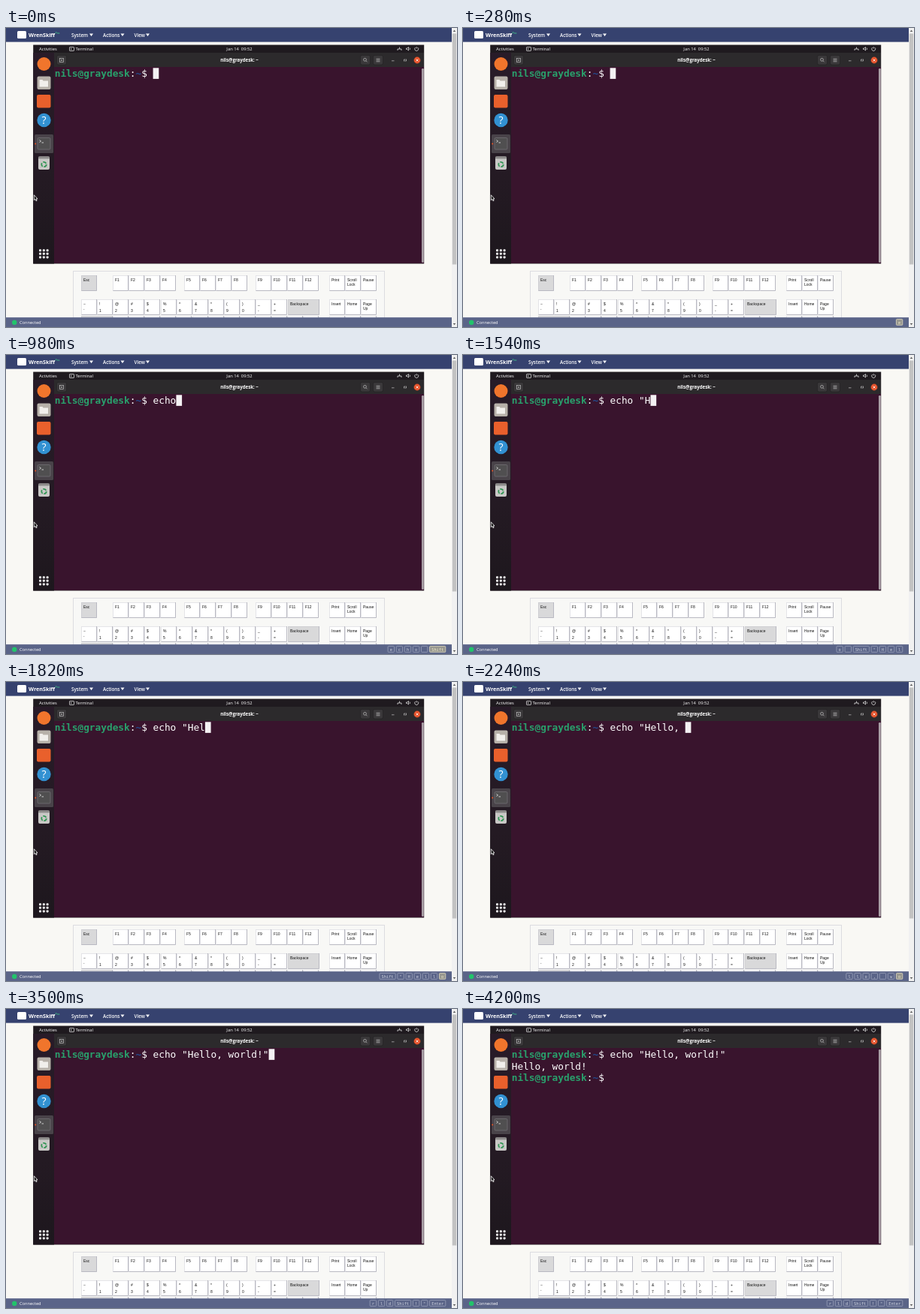
Write an HTML page that moves like this. It is 600 px wide and 399 px high and loops after 4340 ms.

```html
<!DOCTYPE html>
<html lang="en">
<head>
<meta charset="utf-8">
<title>Remote terminal</title>
<style>
  html, body { margin: 0; width: 100%; height: 100%; overflow: hidden; background: #f9f8f4; }
  svg { display: block; width: 600px; height: 399px; }
  text { white-space: pre; }
  .ui { font-family: "Open Sans", "Noto Sans", sans-serif; fill: #fff; }
  .label { font: 5px "Liberation Sans", sans-serif; fill: #111; }
  .term { font: 12.79px "DejaVu Sans Mono", monospace; fill: #fff; }
  .user { font-weight: bold; fill: #29a16c; }
  .path { font-weight: bold; fill: #244a8c; }
  .key { font: 5.3px "DejaVu Sans Mono", monospace; }
</style>
</head>
<body>
<svg viewBox="0 0 600 399">
  <defs>
    <linearGradient id="dock" x2="0" y2="1">
      <stop offset="0" stop-color="#281b28"/>
      <stop offset=".6" stop-color="#241a23"/>
      <stop offset="1" stop-color="#1d171d"/>
    </linearGradient>
  </defs>

  <!-- page -->
  <rect width="600" height="399" fill="#f9f8f4"/>
  <rect width="593" height="18.6" fill="#36426f"/>
  <rect x="15" y="4" width="12" height="10" rx="1.5" fill="#fff"/>
  <g class="ui" font-weight="600" font-size="6.3">
    <text x="30" y="12" font-size="7.2" font-weight="700">WrenSkiff</text>
    <text x="65.5" y="8.2" font-size="3.6" style="fill:#3fc98a">Pro</text>
    <text x="87" y="11.5">System</text>
    <text x="129" y="11.5">Actions</text>
    <text x="170.5" y="11.5">View</text>
    <path d="M111 7.5h5l-2.5 3.5zM152.5 7.5h5l-2.5 3.5zM186 7.5h5l-2.5 3.5z"/>
  </g>

  <!-- remote desktop -->
  <rect x="36.2" y="22.5" width="520" height="292" fill="#1f1a1f"/>
  <rect x="36.2" y="33" width="27.8" height="281.5" fill="url(#dock)"/>
  <g class="ui" font-size="5.8">
    <text x="44" y="30">Activities</text>
    <text x="92.5" y="30">Terminal</text>
    <text x="310.5" y="30" text-anchor="middle">Jan 14  09:52</text>
  </g>
  <g fill="none" stroke="#ddd" stroke-width=".8">
    <rect x="84.5" y="25.5" width="6" height="5" rx=".6"/>
    <path d="M86 27l1.2 1-1.2 1M523.5 25.5v2.5M521 30v-2h5v2"/>
    <path d="M532.5 27h1.2l1.8-1.5v4.5l-1.8-1.5h-1.2zM537 26.5q1.2 1.2 0 2.6"/>
    <path d="M544.7 26a2.5 2.5 0 1 0 3 0M546.2 25v2.5"/>
  </g>

  <!-- window -->
  <rect x="64" y="33" width="492" height="19" fill="#2c2a2c"/>
  <rect x="64" y="52" width="492" height="262" fill="#39142d"/>
  <rect x="553" y="54" width="2.8" height="259" rx="1.2" fill="#a9a0a6"/>
  <text class="ui" x="310.5" y="45" font-size="6.1" font-weight="700" text-anchor="middle">nils@graydesk: ~</text>
  <g fill="#3a383a" stroke="#1e1c1e" stroke-width=".5">
    <rect x="67.5" y="36.5" width="13" height="12.5" rx="2"/>
    <rect x="471.5" y="36.5" width="13" height="12.5" rx="2"/>
    <rect x="488.5" y="36.5" width="13" height="12.5" rx="2"/>
  </g>
  <g fill="none" stroke="#c4c4c4" stroke-width=".7">
    <rect x="71.5" y="40.5" width="5" height="5"/>
    <path d="M74 42v2M73 43h2"/>
    <circle cx="477.5" cy="42.3" r="1.9"/>
    <path d="M479 43.8l1.5 1.5M492.5 41.2h5M492.5 43h5M492.5 44.8h5M513 43.8h3.500"/>
    <path d="M529.5 44.5v-2.5h2M532.5 41.5v2.5h-2"/>
  </g>
  <circle cx="547" cy="43" r="4.4" fill="#e4532c"/>
  <path d="M545.5 41.5l3 3m0-3l-3 3" stroke="#fff" stroke-width=".8"/>

  <!-- dock -->
  <circle cx="50.5" cy="48" r="9" fill="#f0752c"/>
  <rect x="41.5" y="64.5" width="18" height="17.5" rx="2" fill="#b7b1a9"/>
  <path d="M44.5 69h4l1 1.5h6.5v8h-11.500z" fill="#f1efeb"/>
  <rect x="41" y="89" width="18.5" height="17.5" rx="2" fill="#e9602c"/>
  <circle cx="50.5" cy="123" r="9.2" fill="#3291d2"/>
  <text class="ui" x="50.5" y="128" font-size="14" text-anchor="middle">?</text>
  <rect x="38" y="142" width="25" height="25" rx="1.5" fill="#494349"/>
  <circle cx="39.2" cy="154.5" r="1" fill="#e95420"/>
  <rect x="42" y="146.5" width="17" height="15.5" rx="1.5" fill="#504f50" stroke="#77747a" stroke-width=".7"/>
  <path d="M44.5 149.5l2 1.5-2 1.5M47.5 153h2.5" fill="none" stroke="#eee" stroke-width=".8"/>
  <rect x="43" y="171.5" width="15" height="17.5" rx="2" fill="#c9c8c6"/>
  <rect x="43" y="171.5" width="15" height="3" rx="1" fill="#8e8c8b"/>
  <circle cx="50.5" cy="182" r="3.2" fill="none" stroke="#2f9552" stroke-width="1.7" stroke-dasharray="5 1.7"/>
  <g id="apps" fill="#f2f2f2"></g>
  <path d="M37.3 222.8v7l1.6-1.4 1.1 2.4 1.1-.5-1.1-2.3h2z" fill="#111" stroke="#fff" stroke-width=".8"/>

  <!-- terminal -->
  <g class="term">
    <text x="64.7" y="65.3"><tspan class="user">nils@graydesk</tspan>:<tspan class="path">~</tspan>$ <tspan id="typed"></tspan></text>
    <g id="result">
      <text x="64.7" y="80.6">Hello, world!</text>
      <text x="64.7" y="95.9"><tspan class="user">nils@graydesk</tspan>:<tspan class="path">~</tspan>$</text>
    </g>
    <rect id="cursor" width="7.7" height="14.6" fill="#f4f1f3"/>
  </g>

  <!-- on-screen keyboard -->
  <rect x="89.5" y="324.5" width="414" height="80" fill="#f8f8f6" stroke="#dcdce0"/>
  <g id="keyboard"></g>

  <!-- status bar -->
  <rect y="386.2" width="593" height="13" fill="#5a6488"/>
  <circle cx="11.2" cy="393" r="3.2" fill="#22c36b"/>
  <text class="ui" x="18" y="395" font-size="5.7">Connected</text>
  <g id="history"></g>

  <!-- page scrollbar -->
  <rect x="593" width="7" height="399" fill="#f1f1f1"/>
  <rect x="593.8" y="7.5" width="5.4" height="308" fill="#c2c2c2"/>
  <path d="M594.7 5l1.8-2.5 1.8 2.5zM594.7 394l1.8 2.5 1.8-2.500z" fill="#666"/>
</svg>
<script>
const LOOP = 4340, STEP = 140, CELL = 7.7, LEFT = 64.7;
const KEYS = ['e', 'c', 'h', 'o', ' ', 'Shift', '"', ...'Hello, world', 'Shift', '!', '"', 'Enter'];
const $ = id => document.getElementById(id);

function add(parent, tag, attrs, content = '') {
  const node = document.createElementNS('http://www.w3.org/2000/svg', tag);
  for (const name in attrs) node.setAttribute(name, attrs[name]);
  node.textContent = content;
  return parent.appendChild(node);
}

for (let n = 0; n < 9; n++) {
  add($('apps'), 'rect', { x: 44 + n % 3 * 4.8, y: 295.2 + Math.floor(n / 3) * 4.6, width: 3, height: 3, rx: .8 });
}

// Light outline with a darker right and bottom edge.
function drawKey(x, y, label, width = 21, gray = false) {
  add($('keyboard'), 'rect', {
    x: x + .5, y: y + .5, width: width - 1, height: 20,
    fill: gray ? '#d9d9da' : '#fff', stroke: gray ? '#cfcfd3' : '#e4e4e8'
  });
  add($('keyboard'), 'path', {
    d: `M${x + width - .5} ${y}v20.5h${1 - width}`, fill: 'none', stroke: '#b9b9c2'
  });
  const gap = label.length === 3 && label[1] === '\n' ? 9 : 6;
  label.split('\n').forEach((line, n) =>
    add($('keyboard'), 'text', { class: 'label', x: x + 3, y: y + 8 + n * gap }, line));
}
const drawKeys = (x, y, labels) => labels.forEach((label, n) => drawKey(x + Math.round(n * 21.1), y, label));

drawKey(100, 330, 'Esc', 21, true);
drawKeys(142, 330, ['F1', 'F2', 'F3', 'F4']);
drawKeys(237, 330, ['F5', 'F6', 'F7', 'F8']);
drawKeys(332, 330, ['F9', 'F10', 'F11', 'F12']);
drawKeys(430, 330, ['Print', 'Scroll\nLock', 'Pause']);
drawKeys(100, 362, [...'~!@#$%^&*()_+'].map((top, n) => top + '\n' + '`1234567890-='[n]));
drawKey(375, 362, 'Backspace', 42, true);
drawKeys(430, 362, ['Insert', 'Home', 'Page\nUp']);
drawKey(100, 384, '', 42, true);
drawKeys(142, 384, Array(13).fill(''));
drawKeys(430, 384, ['', '', '']);

// The terminal lags two keys behind the key presses.
const pressed = i => i < 13 ? i : i < 22 ? i + 1 : Math.min(i, 23);
const echoed = i => i < 13 ? Math.max(0, i - 2) : Math.min(i - 1, 22);

function drawHistory(i) {
  const count = pressed(i);
  const held = count > pressed(i - 1) && i !== 10;
  let right = 584.8;
  $('history').replaceChildren();
  KEYS.slice(Math.max(0, count - 7), count).reverse().forEach((key, n) => {
    const active = held && n === 0;
    const width = key.length * 3.2 + 5.2;
    add($('history'), 'rect', {
      x: right - width, y: 388.6, width, height: 8, rx: 1,
      fill: active ? '#97978f' : '#5a6488', stroke: active ? '#efe8c8' : '#a4abc2', 'stroke-width': .7
    });
    add($('history'), 'text', {
      class: 'key', x: right - width / 2, y: 394.6, 'text-anchor': 'middle', fill: active ? '#f6efd0' : '#d3d7e2'
    }, key);
    right -= width + 2.7;
  });
}

function draw(i) {
  const done = i >= 25;
  const typed = KEYS.slice(0, echoed(i)).filter(key => key.length === 1).join('');
  $('typed').textContent = typed;
  $('result').style.display = done ? '' : 'none';
  $('cursor').setAttribute('x', LEFT + CELL * (17 + (done ? 0 : typed.length)));
  $('cursor').setAttribute('y', done ? 83.9 : 53.3);
  $('cursor').style.display = i >= 29 ? 'none' : '';
  drawHistory(i);
}

let shown = -1;
const start = performance.now();
function tick() {
  const time = (performance.now() - start) % LOOP;
  const i = time < 2 * STEP ? 0 : Math.floor(time / STEP) - 1;
  if (i !== shown) draw(shown = i);
  requestAnimationFrame(tick);
}
tick();
</script>
</body>
</html>
```
